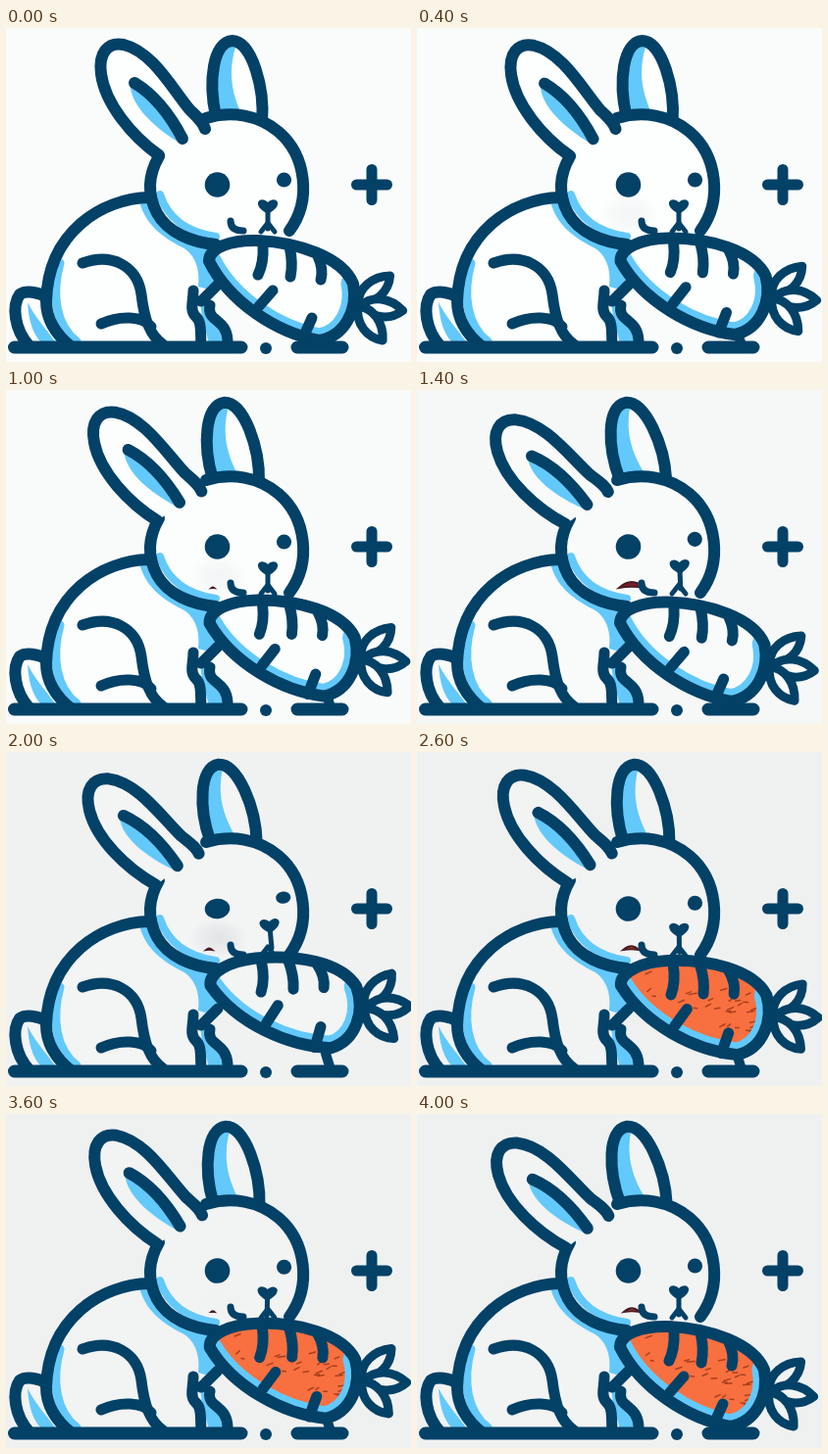
Animation, 413 px wide and 341 px high, one loop 4.1 s. Source, as an HTML page:

```html
<!DOCTYPE html>
<html lang="en">
<head>
<meta charset="utf-8">
<title>Rabbit eating a carrot</title>
<style>
  html, body { margin: 0; width: 100%; height: 100%; overflow: hidden; background: var(--bg); }
  svg { display: block; width: 413px; height: 341px; background: var(--bg);
    --navy: #034167; --sky: #63c9fa; }
  .line { fill: none; stroke: var(--navy); stroke-width: 12; stroke-linecap: round; stroke-linejoin: round; }
  .skin { fill: var(--skin); }
  .sky { fill: var(--sky); }
  .navy { fill: var(--navy); }
  .skyline { fill: none; stroke: var(--sky); stroke-linecap: round; }
</style>
</head>
<body>
<svg viewBox="0 0 413 341">
  <defs>
    <radialGradient id="soft">
      <stop offset="0" stop-color="#d6dadd"/>
      <stop offset=".6" stop-color="#dde0e3" stop-opacity=".7"/>
      <stop offset="1" stop-color="#e6e9eb" stop-opacity="0"/>
    </radialGradient>
    <path id="leaf" d="M0 0C10-12 28-13 43-2C32 10 14 12 0 0Z"/>
    <path id="root" d="M207 238C207 224 230 216 257 217C298 219 343 234 354 261C359 287 346 315 319 319C276 311 228 280 207 238Z"/>
    <clipPath id="inside"><use href="#root"/></clipPath>
  </defs>

  <!-- tail and body -->
  <path class="skin" d="M42 275C32 269 20 268 14 272C6 283 8 308 24 325H60Z"/>
  <path class="sky" d="M22 280C23 298 27 311 35 320H50C40 306 30 296 22 280Z"/>
  <path class="line" d="M42 275C32 269 20 268 14 272C6 283 8 308 24 325"/>
  <path class="skin" d="M146 173C98 174 43 208 41 279C41 298 52 314 67 326H200L212 225Z"/>
  <path class="skyline" stroke-width="9" d="M55 240C46 272 51 304 72 320"/>
  <path class="sky" d="M136 177L152 180C160 205 184 220 209 222L222 262L203 266L196 264C198 248 194 232 180 224C158 213 142 200 136 177Z"/>
  <path class="line" d="M146 173C98 174 43 208 41 279C41 298 52 314 67 326"/>
  <path class="line" style="stroke-width:11" d="M78 240C108 229 134 243 138 272C141 298 147 314 160 323M97 302C116 293 140 294 148 305"/>
  <path class="sky" d="M198 280L208 276L212 298L222 306V322H207L200 296Z"/>
  <path class="line" style="stroke-width:11" d="M191 268C191 279 187 288 193 294C200 300 198 310 199 324M216 262L199 279M208 283C204 300 225 296 226 319"/>

  <!-- right ear, head, left ear -->
  <g id="earR">
    <path class="skin" d="M214 90C206 55 211 14 231 13C251 14 264 62 261 96Z"/>
    <path class="sky" d="M232 15C211 16 208 55 215 90H241C229 64 227 43 234 20Z"/>
    <path class="line" d="M214 90C206 55 211 14 231 13C251 14 264 62 261 96"/>
  </g>
  <path class="skin" d="M156 131C145 150 144 170 154 189C165 209 190 219 214 221L288 208C312 176 306 130 278 106C258 89 230 84 203 93Z"/>
  <path class="skyline" stroke-width="8" d="M157 170C165 195 186 209 214 213"/>
  <ellipse id="cheek" cx="217" cy="190" rx="31" ry="21" fill="url(#soft)"/>
  <path id="mouth" stroke="#4b1c22"/>
  <path class="line" d="M156 131C145 150 144 170 154 189C165 209 190 219 214 221M204 92C230 84 258 89 278 106C306 130 312 176 289 207"/>
  <g id="earL">
    <path class="skin" d="M156 130C128 110 101 77 97 47C94 25 104 14 120 17C149 24 169 61 187 83C195 91 201 96 203 103Z"/>
    <path class="sky" d="M127 52C123 76 150 101 178 118L184 112L160 77Z"/>
    <path class="line" d="M156 130C128 110 101 77 97 47C94 25 104 14 120 17C149 24 169 61 187 83C195 91 201 96 203 103M131 56C151 68 168 90 180 113"/>
  </g>

  <!-- face -->
  <g id="face">
    <g id="open" class="navy">
      <ellipse id="eyeL" cx="215.5" cy="160" rx="12.8"/>
      <ellipse id="eyeR" cx="283.5" cy="155" rx="7.6"/>
    </g>
    <path id="shut" class="line" style="stroke-width:5" d="M206 163Q217 158 230 161M276 159Q284 156 291 158"/>
    <path class="navy" d="M267 190C262 187 256 183 257 178C259 174 264 175 267 178C270 175 275 174 277 178C278 183 272 187 267 190Z"/>
    <path class="line" style="stroke-width:5" d="M267 187V205"/>
  </g>
  <path class="line" style="stroke-width:5" d="M260 208L267 199L274 208"/>
  <path class="line" style="stroke-width:7" d="M229 197Q229 207 242 207"/>

  <!-- ground and plus -->
  <path class="line" style="stroke-width:13" d="M8.500 326H240M297 326H343"/>
  <circle class="navy" cx="265" cy="327" r="6"/>
  <path class="line" style="stroke-width:11" d="M357.500 160H388.500M373 144.500V175.500"/>
  <path class="line" id="stand" style="stroke-width:10" d="M326 308L331 324"/>

  <g id="carrot">
    <g class="line" style="stroke-width:9;fill:var(--skin)">
      <use href="#leaf" transform="translate(359 281) rotate(-38)"/>
      <use href="#leaf" transform="translate(362 283) rotate(10)"/>
      <use href="#leaf" transform="translate(359 284) rotate(57)"/>
    </g>
    <use href="#root" class="skin"/>
    <g clip-path="url(#inside)">
      <g id="orange">
        <use href="#root" fill="#f8703f"/>
        <path id="ticks" fill="none" stroke="#a8401f" stroke-width="1.500" stroke-linecap="round"/>
      </g>
      <path class="skyline" stroke-width="25" d="M207 238C228 280 276 311 319 319C346 315 359 287 354 261"/>
    </g>
    <use href="#root" class="line"/>
    <path class="line" style="stroke-width:11" d="M262 222Q263 240 257 252M289 223Q293 240 290 254M318 233Q324 246 321 257M272 268L258 284M312 296L303 316"/>
  </g>
</svg>
<script>
const LOOP = 4100, STEP = 100;
const $ = id => document.getElementById(id);
const set = (id, attrs) => { for (const k in attrs) $(id).setAttribute(k, attrs[k]); };

// key poses: ear angle and how far the carrot hangs down
const beats = [0, 700, 1400, 2000, 2600, 3200, 4000];
const ear = [0, -.8, -8, -6.3, -4.2, 1.5, -7.5];
const hang = [1, .4, .93, 0, .4, 0, 1];

const smooth = p => (1 - Math.cos(Math.PI * Math.min(1, Math.max(0, p)))) / 2;
const ramp = (t, from, to) => smooth((t - from) / (to - from));
const pulse = (t, mid, reach) => smooth(1 - Math.abs(t - mid) / reach);

function pose(values, t) {
  const i = Math.max(1, beats.findIndex(b => b >= t));
  return values[i - 1] + (values[i] - values[i - 1]) * ramp(t, beats[i - 1], beats[i]);
}

function ticks(n) {
  let seed = 7, d = '';
  const rnd = () => (seed = seed * 16807 % 2147483647) / 2147483647;
  for (let i = 0; i < n; i++) {
    const x = 224 + rnd() * 120, y = 226 + (x - 224) * .28 + rnd() * 44;
    d += `M${x} ${y}l${3 + rnd() * 5} ${rnd() * 4 - 3}`;
  }
  return d;
}

function drawMouth(t, orange) {
  const gape = pulse(t, 3200, 500);
  const w = 13 * pulse(t, 1400, 500) + 3 * pulse(t, 2000, 300) + 8 * pulse(t, 2600, 300)
    + 16 * gape + 8 * pulse(t, 4000, 400);
  const x = 213 + 6 * Math.cos(2 * Math.PI * (t - 1400) / 1300), y = 202, h = w * .9;
  set('mouth', {
    d: `M${x - w} ${y}Q${x} ${y - h} ${x + w} ${y}Q${x} ${y + h * (1.3 * gape - .2)} ${x - w} ${y}Z`,
    transform: `rotate(${12 * gape} ${x} ${y})`,
    fill: orange > .5 ? '#ee5f35' : '#7c1f2b',
    'stroke-width': w ? 2 : 0
  });
}

function draw(t) {
  const a = pose(ear, t), orange = ramp(t, 2000, 2500);
  const lift = (pose(hang, t) - 1) * 8.5;
  const tilt = 5 * pulse(t, 3250, 500) - 5.5 * pulse(t, 1900, 900);
  const eye = Math.max(0, 1 - .2 * pulse(t, 2000, 300) - 1.3 * pulse(t, 3250, 250));
  const g = 251 - 11 * ramp(t, 700, 2400);

  const root = document.documentElement.style;
  root.setProperty('--bg', `rgb(${g - 1},${g + 1},${g + 1})`);
  root.setProperty('--skin', `rgb(${g + 2},${g + 3},${g + 3})`);

  set('earL', { transform: `translate(${a * .7} ${a * -.5}) rotate(${a} 180 120)` });
  set('earR', { transform: `translate(${a * .85} ${a * .25}) rotate(${a} 238 95)` });
  set('face', { transform: `rotate(${tilt} 215 160)` });
  set('carrot', { transform: `rotate(${lift} 212 228)` });
  set('stand', { opacity: lift < -2.5 ? 1 : 0 });
  set('orange', { opacity: orange });
  set('cheek', { opacity: .7 * pulse(t, 700, 500) + .6 * pulse(t, 2000, 500) + .2 * pulse(t, 3200, 600) });
  set('open', { opacity: eye < .15 ? 0 : 1 });
  set('shut', { opacity: eye < .15 ? 1 : 0 });
  set('eyeL', { ry: 12.8 * eye });
  set('eyeR', { ry: 7.6 * eye });
  drawMouth(t, orange);
}

set('ticks', { d: ticks(30) });
function frame() {
  draw(Math.floor(performance.now() % LOOP / STEP) * STEP);
  requestAnimationFrame(frame);
}
frame();
</script>
</body>
</html>
```
